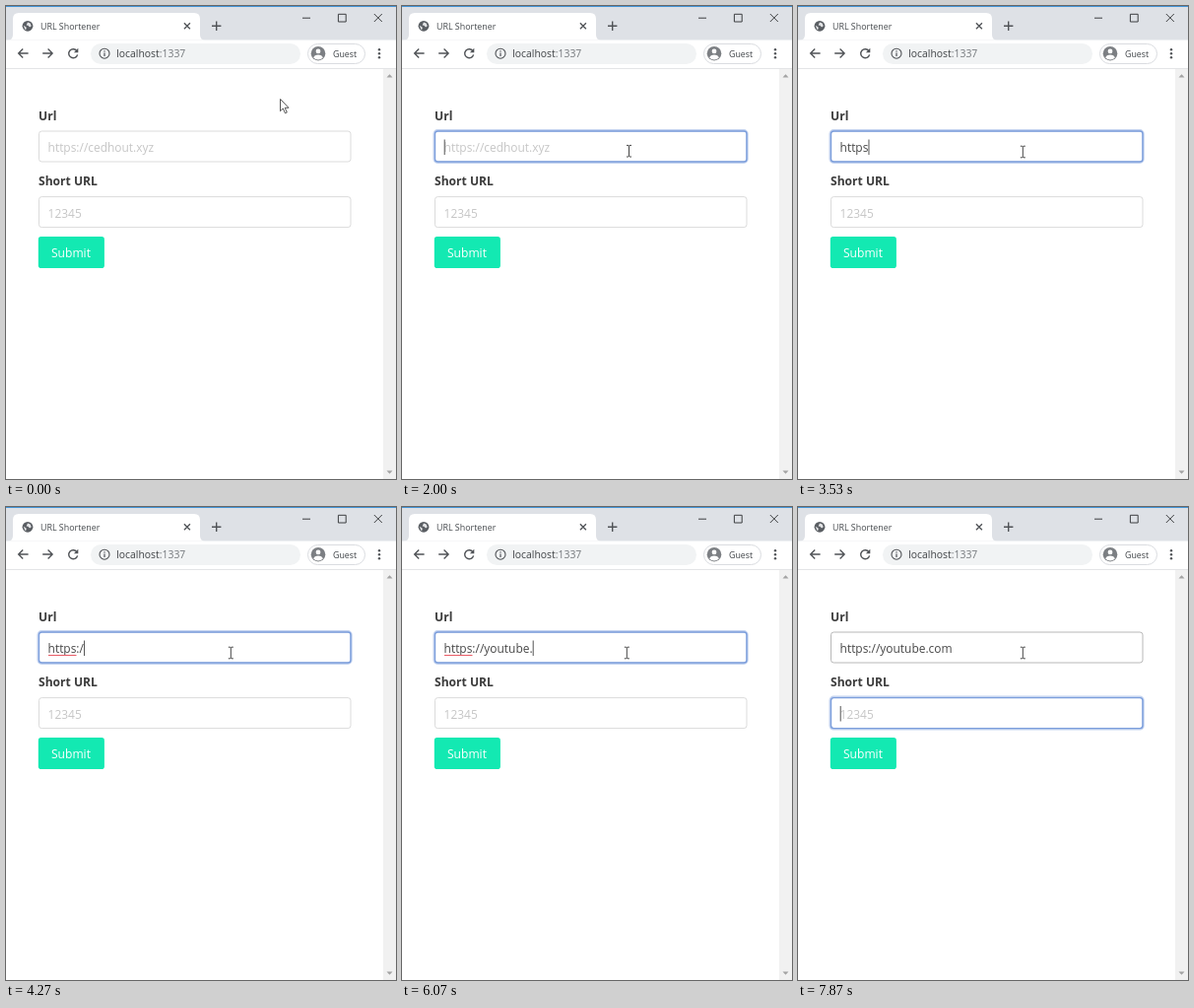
Write an HTML page that moves like this. It is 396 px wide and 480 px high and loops after 8 s.

```html
<!DOCTYPE html>
<html lang="en">
<head>
<meta charset="utf-8">
<title>URL Shortener</title>
<style>
  html, body { margin: 0; width: 100%; height: 100%; overflow: hidden; background: #fff; }
  svg { display: block; width: 396px; height: 480px; }
  text { font-family: "Open Sans", "Noto Sans", sans-serif; font-size: 11.95px; fill: #484848; white-space: pre; }
  .label { font-size: 12.1px; font-weight: 700; fill: #3c3c3c; }
  .hint { fill: #c6c6c6; }
  .line { fill: none; stroke: #505357; stroke-width: 1.4; }
  .thin { fill: none; stroke: #3c3e40; stroke-width: 1; }
  .field rect { fill: none; stroke: #dbdbdb; }
  .field .ring { stroke: none; }
  .field.hover .edge { stroke: #b8b8b8; }
  .field.focus .edge { stroke: #7d9fdc; stroke-width: 1.4; }
  .field.focus .ring { stroke: #c3d3f0; stroke-width: 2.4; }
</style>
</head>
<body>
<svg viewBox="0 0 396 480">
  <!-- Tab strip -->
  <rect width="396" height="35" fill="#dee1e6"/>
  <rect width="396" height="1" fill="#4596d8"/>
  <path d="M2 34.5Q7 34.5 7 29V13Q7 7 13 7H191Q197 7 197 13V29Q197 34.5 202 34.5Z" fill="#fff"/>
  <circle cx="22" cy="20.3" r="5.4" fill="#5a5e63"/>
  <path d="M17.8 19.8L20.6 21.6V23.6L19.4 24ZM22 16.4L24.6 17.4 25.8 20.2 24 21.4 22.4 19.8 20.6 19.4Z" fill="#e4e5e7"/>
  <text x="35" y="23.9" style="font-size:8.9px;fill:#45494d">URL Shortener</text>
  <path class="line" style="stroke-width:1.3" d="M180.9 17.2L186.9 23.2M186.9 17.2L180.9 23.2"/>
  <path class="line" d="M209 20.3H218.4M213.7 15.6V25"/>
  <path class="thin" d="M301 12.2H309M337.4 8.3H345.2V16H337.4ZM373.8 8L381.8 16M381.8 8L373.8 16"/>

  <!-- Toolbar -->
  <rect y="34.5" width="396" height="29" fill="#fff"/>
  <rect y="63" width="396" height="1" fill="#e3e4e6"/>
  <path class="line" d="M22.6 48H13M17.2 43.5L12.7 48 17.2 52.5M37.2 48H46.8M42.6 43.5L47.1 48 42.6 52.5"/>
  <path class="line" d="M71.9 45.6A4.5 4.5 0 1 0 72.6 49.3"/>
  <path d="M73.3 42.8V47.2H68.9Z" fill="#505357"/>
  <rect x="86" y="38" width="213" height="21" rx="10.5" fill="#f1f3f4"/>
  <circle class="line" style="stroke-width:1.1" cx="100" cy="48.2" r="5"/>
  <path class="line" style="stroke-width:1.2" d="M100 47.5V50.9M100 45.2V46.4"/>
  <text x="112.2" y="52" style="font-size:10.4px;fill:#3f4245">localhost<tspan fill="#74787c">:1337</tspan></text>
  <rect x="306.5" y="38.5" width="58" height="20" rx="10" fill="#fff" stroke="#dadce0"/>
  <circle cx="317" cy="48.2" r="7.3" fill="#7c7f83"/>
  <circle cx="317" cy="45.9" r="2.4" fill="#fff"/>
  <path d="M312.2 52.4Q313 49.4 317 49.4T321.8 52.4Q319.8 54.4 317 54.4T312.2 52.4" fill="#fff"/>
  <text x="332" y="51.5" style="font-size:8.8px;fill:#3f4347">Guest</text>
  <g fill="#505357"><circle cx="379" cy="44.2" r="1.2"/><circle cx="379" cy="48.2" r="1.2"/><circle cx="379" cy="52.2" r="1.2"/></g>

  <!-- Scrollbar -->
  <rect x="383" y="64" width="13" height="416" fill="#f1f1f1"/>
  <path d="M386.5 72.5L389.5 69.2 392.5 72.5ZM386.5 471.5L389.5 474.8 392.5 471.5Z" fill="#a3a3a3"/>

  <!-- Form -->
  <text class="label" x="33" y="115.6">Url</text>
  <g class="field" id="url">
    <rect class="ring" x="32.7" y="126.2" width="317.8" height="32.6" rx="3.5"/>
    <rect class="edge" x="33.5" y="127" width="316.5" height="31" rx="2.8"/>
    <text class="hint" id="hint" x="42.6" y="148">https://cedhout.xyz</text>
    <text id="typed" x="42.6" y="148"></text>
    <path id="squiggle" d="M43 150.5H71.5" stroke="#e8606a" stroke-width="1.1"/>
  </g>
  <text class="label" x="33" y="182">Short URL</text>
  <g class="field" id="short">
    <rect class="ring" x="32.7" y="192.8" width="317.8" height="32.6" rx="3.5"/>
    <rect class="edge" x="33.5" y="193.6" width="316.5" height="31" rx="2.8"/>
    <text class="hint" x="42.6" y="214.5">12345</text>
  </g>
  <rect id="caret" width="1" height="15.5" fill="#555"/>
  <rect x="32.8" y="234.1" width="67.1" height="32" rx="2.8" fill="#13e9b2"/>
  <text x="46" y="254.8" style="font-size:12.05px;fill:#fff">Submit</text>

  <!-- Pointers -->
  <path id="arrow" d="M.5 .5V12.7L3.3 10 5.4 14.8 7.3 14 5.2 9.3H9Z" fill="#fff" stroke="#444" stroke-width=".9"/>
  <path id="beam" d="M-2.5 -5.8H-.6L0 -5.2 .6 -5.8H2.5M0 -5.2V5.2M-2.5 5.8H-.6L0 5.2 .6 5.8H2.5" fill="none" stroke="#444"/>
</svg>
<script>
const LOOP = 8000, FPS = 15, BLINK = 8;
const TEXT = "https://youtube.com";
// Ticks at which each character is typed
const KEYS = [43, 46, 49, 51, 53, 58, 63, 67, 75, 78, 80, 82, 85, 86, 88, 91, 95, 97, 98];
const FOCUS_URL = 30, FOCUS_SHORT = 113, MARK_ON = 64, MARK_OFF = 106;
// Pointer path: tick, x, y
const PATH = [[0, 278, 94], [5, 274, 100], [23, 274, 100], [24, 271, 104],
  [29, 230.5, 147.2], [34, 230.5, 147.2], [35, 228.3, 148]];

const $ = id => document.getElementById(id);
const url = $("url"), short = $("short"), hint = $("hint"), typed = $("typed");
const squiggle = $("squiggle"), caret = $("caret"), arrow = $("arrow"), beam = $("beam");
const show = (el, on) => el.style.display = on ? "" : "none";

function pointerAt(tick) {
  const i = PATH.findIndex(p => p[0] > tick);
  if (i < 0) return PATH[PATH.length - 1].slice(1);
  const [t0, x0, y0] = PATH[i - 1], [t1, x1, y1] = PATH[i];
  const f = (tick - t0) / (t1 - t0);
  return [x0 + (x1 - x0) * f, y0 + (y1 - y0) * f];
}

function draw(tick) {
  const count = KEYS.filter(k => k <= tick).length;
  const inShort = tick >= FOCUS_SHORT, inUrl = tick >= FOCUS_URL && !inShort;
  const [x, y] = pointerAt(tick), over = y >= 127;

  typed.textContent = TEXT.slice(0, count);
  show(hint, !count);
  show(squiggle, tick >= MARK_ON && tick < MARK_OFF);
  url.classList.toggle("hover", over);
  url.classList.toggle("focus", inUrl);
  short.classList.toggle("focus", inShort);

  const last = inShort ? FOCUS_SHORT : count ? KEYS[count - 1] : FOCUS_URL;
  show(caret, (inUrl || inShort) && (tick - last) % (2 * BLINK) < BLINK);
  const width = inUrl && count ? typed.getComputedTextLength() : 0;
  caret.setAttribute("x", 42.7 + width);
  caret.setAttribute("y", inShort ? 202 : 135.5);

  show(arrow, !over);
  show(beam, over);
  (over ? beam : arrow).setAttribute("transform", `translate(${x} ${y})`);
}

let start, shown = -1;
function loop(now) {
  start ??= now;
  const tick = Math.floor((((now - start) % LOOP) + 4) * FPS / 1000) % (LOOP * FPS / 1000);
  if (tick !== shown) draw(shown = tick);
  requestAnimationFrame(loop);
}
draw(0);
requestAnimationFrame(loop);
</script>
</body>
</html>
```
